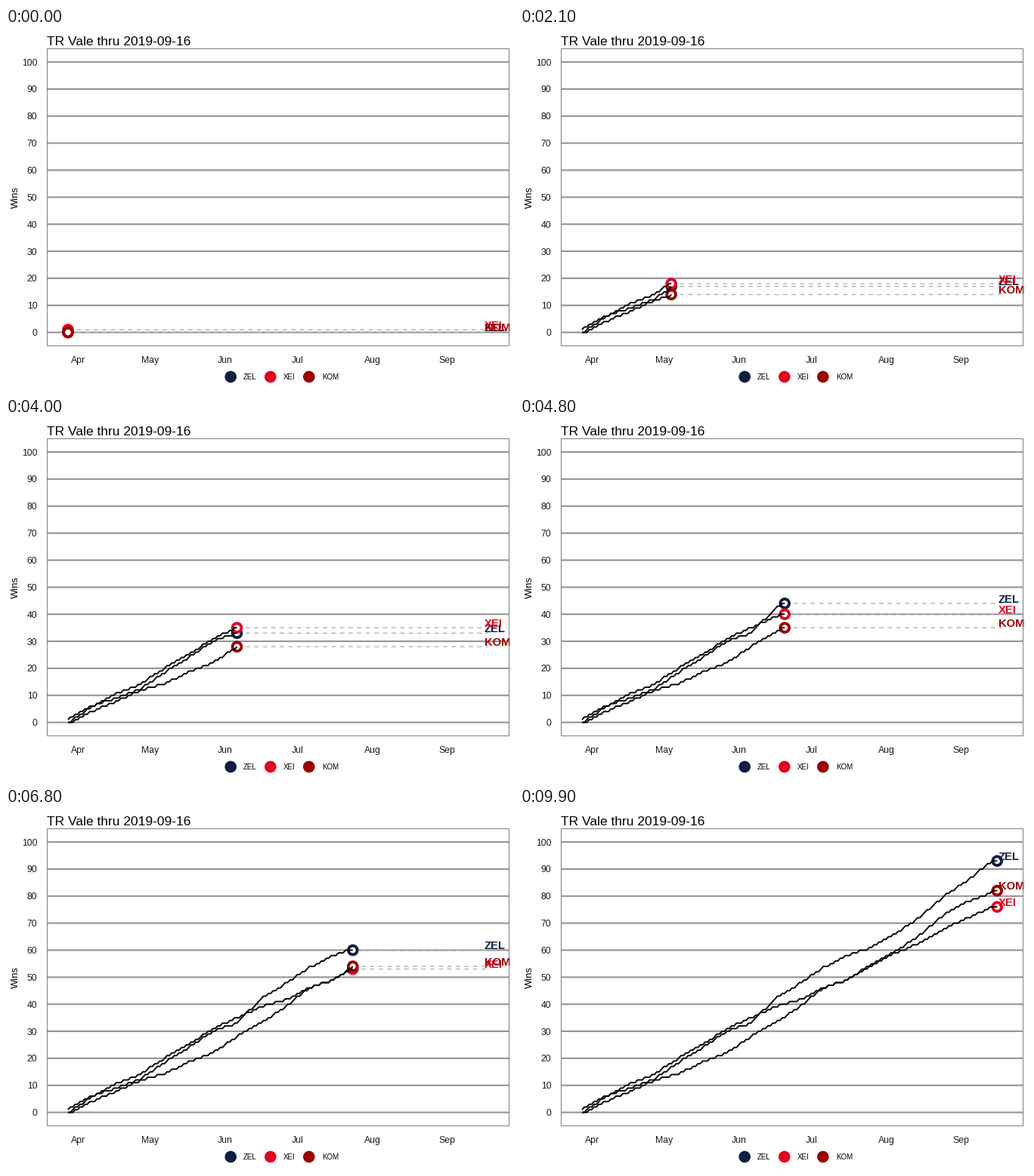
Write a matplotlib script that moves like this. It is 672 px wide and 480 px high and loops after 10000 ms.

```python
import math

import numpy as np
import matplotlib.pyplot as plt
from matplotlib.animation import FuncAnimation
from matplotlib.patches import Circle, Rectangle

W, H, DPI = 672, 480, 100
FRAMES, INTERVAL = 100, 100
LAST_DAY, END_DAY, STEP = 172, 174, 10
PT = 72 / DPI  # points per pixel

plt.rcParams["font.family"] = "Liberation Sans"

# Name, colour and the trend of wins at every tenth day.
TEAMS = [
    ("ZEL", "#111e44", [-.4, 6, 9, 12.4, 18.4, 24, 30, 33, 42, 47.5, 53.5,
                        58, 61, 66, 72.3, 80, 86, 93, 93]),
    ("XEI", "#e1061f", [1, 6, 10.7, 14.2, 20, 25, 31, 35, 39, 41.5, 46,
                        49, 54, 59, 62.6, 68, 72, 76, 76]),
    ("KOM", "#990000", [-.4, 4, 7.8, 11.8, 14.4, 18.5, 22, 28, 33, 39, 46,
                        49, 55, 59.5, 65.5, 73, 78, 81.5, 84]),
]


def px(day):
    return 82 + 3.193 * day


def py(wins):
    return 403.6 - 3.585 * wins


def daily(trend):
    """Whole wins per day, following the trend."""
    days = np.arange(LAST_DAY + 1)
    return np.floor(np.interp(days / STEP, range(len(trend)), trend) + 0.5)


fig = plt.figure(figsize=(W / DPI, H / DPI), dpi=DPI, facecolor="white")
ax = fig.add_axes([0, 0, 1, 1])
ax.set(xlim=(0, W), ylim=(H, 0))
ax.axis("off")


def label(x, y, text, size, **kw):
    return ax.text(x, y, text, fontsize=size * PT, va="baseline", **kw)


def stroke(x, y, width, color, z, **kw):
    return ax.plot(x, y, lw=width * PT, color=color, zorder=z,
                   solid_capstyle="butt", dash_capstyle="butt",
                   solid_joinstyle="round", snap=False, **kw)[0]


def disc(x, y, r, color, z):
    return ax.add_patch(Circle((x, y), r, fc=color, ec="none", zorder=z))


# Fixed parts
for wins in range(0, 101, 10):
    stroke([54, 666], [py(wins)] * 2, 2.1, "#949494", 1)
    label(41.3, py(wins) + 4.5, str(wins), 12.2, ha="right", color="#1a1a1a")
for day, month in zip((4, 34, 65, 95, 126, 157),
                      ("Apr", "May", "Jun", "Jul", "Aug", "Sep")):
    label(px(day) + 0.3, 444.3, month, 12.2, ha="center", color="#1a1a1a")
label(53.5, 23, "TR Vale thru 2019-09-16", 17.4)
label(16.2, 224.5, "Wins", 13, ha="center", rotation=90,
      rotation_mode="anchor")
ax.add_patch(Rectangle((54.5, 27.5), 611, 394, fill=False, ec="#7f7f7f",
                       lw=PT, snap=False, zorder=8))
panel = ax.add_patch(Rectangle((54, 27), 612, 395, fc="none", ec="none"))


class Team:
    def __init__(self, k, name, color, trend):
        self.wins = daily(trend)
        self.dash = stroke([], [], 1.42, "#b3b3b3", 2, ls=(0, (4, 4)))
        self.ring = disc(0, 0, 7.8, color, 3 + k / 10)
        self.hole = disc(0, 0, 3.9, "white", 3.05 + k / 10)
        self.line = stroke([], [], 1.9, "black", 5)
        self.tag = label(632.8, 0, name, 14.8, color=color, weight="bold",
                         zorder=6 + k / 10)
        self.tag.set_clip_path(panel)

    def show(self, day):
        x, y = px(day), py(self.wins[day])
        self.dash.set_data([x, px(END_DAY)], [y, y])
        self.ring.center = self.hole.center = (x, y)
        self.line.set_data(px(np.arange(day + 1)), py(self.wins[:day + 1]))
        self.tag.set_y(y - 1.2)


teams = [Team(k, *team) for k, team in enumerate(TEAMS)]
for (name, color, _), x in zip(TEAMS, (297.2, 349.8, 400.8)):
    disc(x, 462.5, 7.8, color, 3)
    label(x + 17, 466.3, name, 9.8)


def update(i):
    # The reveal snaps to whole days.
    day = max(0, math.ceil(LAST_DAY * i / (FRAMES - 1) - 0.15))
    for team in teams:
        team.show(day)
    return []


anim = FuncAnimation(fig, update, frames=FRAMES, interval=INTERVAL,
                     init_func=lambda: update(0), repeat=True, repeat_delay=0)
plt.show()
```
